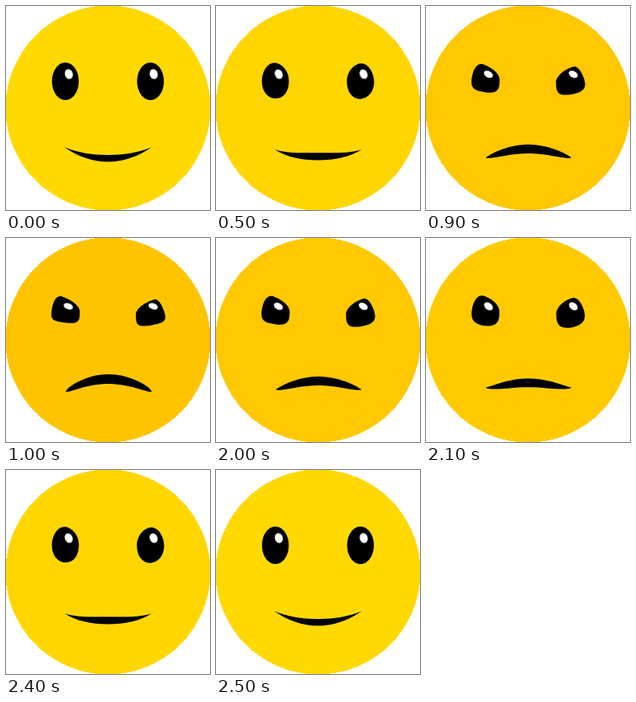
These frames come from a looping animation (256 px wide and 256 px high, 2.8 s). An HTML page:

```html
<!DOCTYPE html>
<html lang="en">
<head>
<meta charset="utf-8">
<title>Mood swing</title>
<style>
  html, body { margin: 0; width: 100%; height: 100%; overflow: hidden; background: #fff; }
  svg { display: block; width: 100vw; height: 100vh; }

  /* Six equal jumps per change, the first one at once */
  .face, .shape, .glint {
    animation: 2800ms steps(5, jump-both) infinite;
  }
  .face { animation-name: tint; }
  .shape { animation-name: morph; d: var(--happy); }
  .glint { animation-name: squash; fill: #fff; }

  @keyframes tint {
    0%, 17.857%, 89.285%, 100% { fill: rgb(255, 217, 0); }
    35.714%, 71.428% { fill: rgb(255, 196, 0); }
  }
  @keyframes morph {
    0%, 17.857%, 89.285%, 100% { d: var(--happy); }
    35.714%, 71.428% { d: var(--angry); }
  }
  @keyframes squash {
    0%, 17.857%, 89.285%, 100% {
      transform: translate(var(--x), 85.5px) rotate(75deg) scale(6.3, 5);
    }
    35.714%, 71.428% {
      transform: translate(calc(var(--x) - 0.6px), 85.8px) rotate(20deg) scale(6, 3.8);
    }
  }

  .eye-l {
    --happy: path("M74.5 71 C83.8 71 91.3 81.5 91.3 94.5 C91.3 107.5 83.8 118 74.5 118 C65.2 118 57.7 107.5 57.7 94.5 C57.7 81.5 65.2 71 74.5 71 Z");
    --angry: path("M69 73 C74 74.5 95.5 83 92.5 95 C92.5 105 90 108 76 106.5 C64 105 57 104 57 97 C57 88 60 72 69 73 Z");
  }
  .eye-r {
    --happy: path("M181.3 71 C190.6 71 198.1 81.5 198.1 94.5 C198.1 107.5 190.6 118 181.3 118 C172 118 164.5 107.5 164.5 94.5 C164.5 81.5 172 71 181.3 71 Z");
    --angry: path("M187 77 C193 76 200 93 200 99 C200 106 193 107.5 180 110 C166 111.5 163 110 163 98 C161.5 87 180 78.5 187 77 Z");
  }
  .mouth {
    --happy: path("M73 177 C89 188.5 109 195.5 128 195.5 C147 195.5 167 188.5 183 177 C167 184 146 187 128 187 C110 187 89 184 73 177 Z");
    --angry: path("M75.5 193 C80 194 102 183 128 183 C154 183 178 194 182.5 193 C185 190 160 171 128 171 C98 171 73 190 75.5 193 Z");
  }
  .glint-l { --x: 78.8px; }
  .glint-r { --x: 185.3px; }
</style>
</head>
<body>
<svg viewBox="0 0 256 256">
  <circle class="face" cx="128" cy="128" r="128.6" shape-rendering="crispEdges"/>
  <path class="shape eye-l"/>
  <path class="shape eye-r"/>
  <circle class="glint glint-l" r="1"/>
  <circle class="glint glint-r" r="1"/>
  <path class="shape mouth"/>
</svg>
</body>
</html>
```
